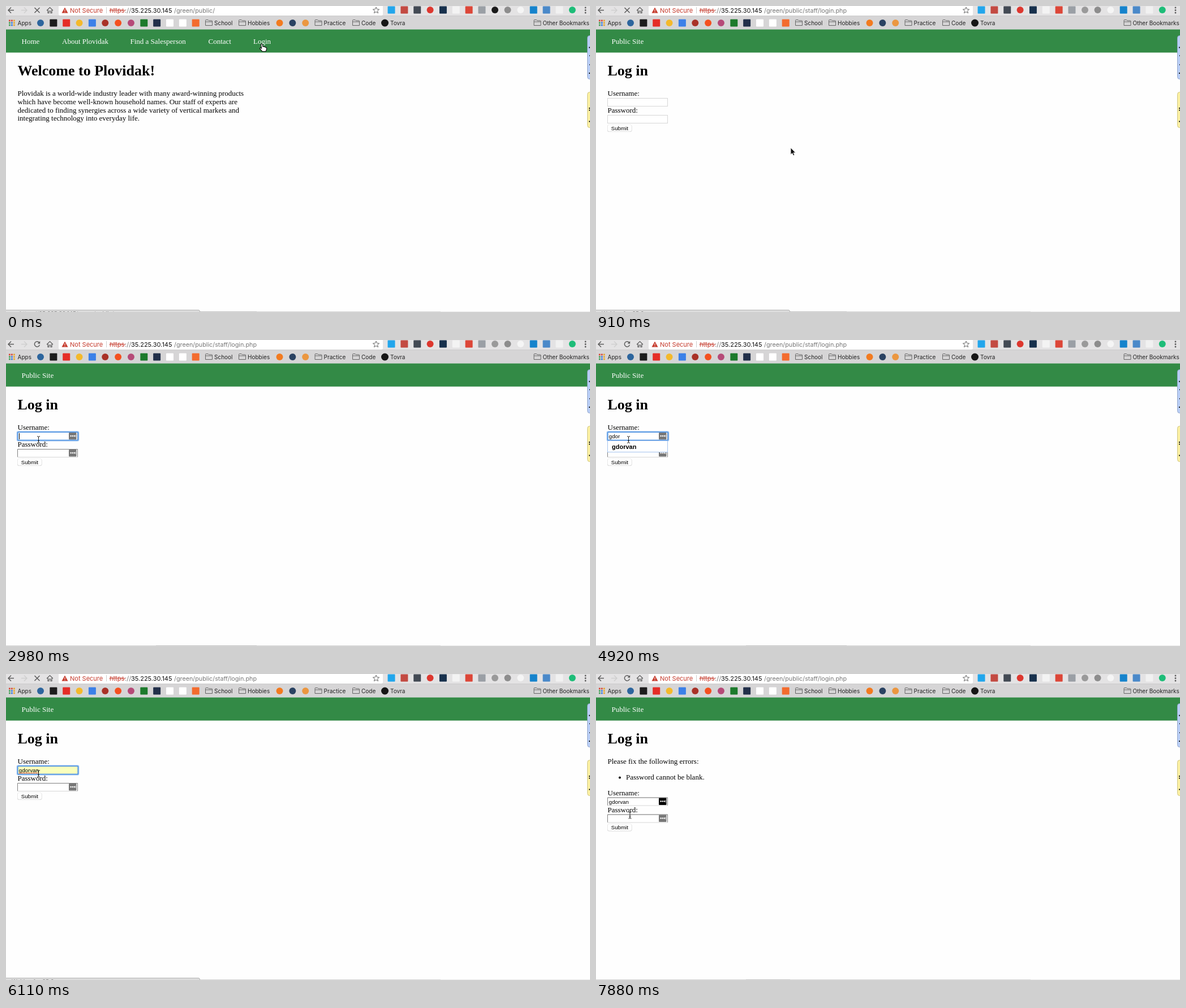
An HTML page that plays this animation: 1032 px wide and 542 px high, repeating every 8000 ms.

```html
<!DOCTYPE html>
<html lang="en">
<head>
<meta charset="utf-8">
<title>Log in</title>
<style>
  html, body { margin: 0; width: 100%; height: 100%; overflow: hidden; background: #fefefe; }
  svg { display: block; width: 100%; height: 100%; }
  text { white-space: pre; }
  .ui { font: 11px Inter, Roboto, sans-serif; }
  .bookmark { font: 10px Inter, Roboto, sans-serif; fill: #222; }
  .page { font: 13px "Liberation Serif", serif; }
  .title { font: bold 26px "Liberation Serif", serif; }
  .field { font: 9.7px "Liberation Sans", sans-serif; }
  .option { font: bold 11px "Liberation Sans", sans-serif; }
  .nav { fill: #fff; }
  .line { fill: none; stroke: #5c5c5c; stroke-width: 1.5; }
</style>
</head>
<body>
<svg viewBox="0 0 1032 542" preserveAspectRatio="none">
  <defs>
    <g id="folder">
      <path d="M.5 10.5V1.5Q.5.5 1.5.5H5L6.5 2H11.5Q12.5 2 12.5 3V10.5ZM.5 4H12.5" fill="none" stroke="#666"/>
    </g>
    <g id="key">
      <rect x="111" y="164" width="13.5" height="12.5" rx="1"/>
      <g fill="#fff">
        <circle cx="114.5" cy="170" r="1.2"/><circle cx="117.6" cy="170" r="1.2"/><circle cx="120.7" cy="170" r="1.2"/>
        <rect x="122.4" y="168" width=".8" height="4"/>
      </g>
    </g>
    <g id="box">
      <rect x="20.5" y="163.5" width="106" height="14" fill="#fff" stroke="#d6d6d6"/>
    </g>
    <path id="inset" d="M20.5 177V163.5H126.5V177" fill="none" stroke="#808080"/>
  </defs>

  <!-- browser chrome -->
  <rect width="1032" height="41.5" fill="#d6d5d6"/>
  <rect width="1032" height="17" fill="#e4e3e4"/>
  <path d="M93 0H666V14Q666 17 663 17H96Q93 17 93 14Z" fill="#fff"/>
  <path d="M0 17.5H1032" stroke="#cbcacb"/>
  <path class="line" d="M14 7.5H4M9 2.5L4 7.5L9 12.5"/>
  <path class="line" d="M27 7.5H37M32 2.5L37 7.5L32 12.5" style="stroke:#cfcfcf"/>
  <path class="line" id="stop" d="M50.5 3L59.5 12M59.5 3L50.5 12"/>
  <g id="reload">
    <path class="line" d="M58.6 4.5A4.6 4.6 0 1 0 59.4 8.6"/>
    <path d="M60.2 2V6.6H55.6Z" fill="#5c5c5c"/>
  </g>
  <path class="line" d="M72 8L77.5 2.5L83 8M74 7V12.5H76V9H79V12.5H81V7" style="stroke-width:1.2"/>
  <path d="M104 2.5L109.5 12.5H98.5Z" fill="#c53a2c"/>
  <path d="M104 6V9.3M104 10.3V11.4" stroke="#fff"/>
  <g class="ui">
    <text x="113" y="12" fill="#c53a2c">Not Secure</text>
    <path d="M177.5 2V13" stroke="#ccc"/>
    <text x="183" y="12" fill="#c53a2c">https</text>
    <path d="M182.5 8H211" stroke="#c53a2c"/>
    <text x="210" y="12" fill="#777">://</text>
    <text x="221" y="12" fill="#111">35.225.30.145</text>
    <text id="path" x="297" y="12" fill="#777" style="font-size:10.8px"></text>
  </g>
  <path d="M654 2L655.6 5.7L659.6 6L656.5 8.6L657.5 12.5L654 10.4L650.5 12.5L651.5 8.6L648.4 6L652.4 5.7Z" fill="none" stroke="#666"/>
  <g fill="#5c5c5c"><circle cx="1024" cy="3" r="1.4"/><circle cx="1024" cy="7.5" r="1.4"/><circle cx="1024" cy="12" r="1.4"/></g>
  <g id="marks"></g>
  <g id="apps"></g>
  <g id="folders"></g>
  <text class="bookmark" x="20.5" y="33.5">Apps</text>
  <text class="bookmark" x="679" y="33.5">Tovra</text>

  <!-- page -->
  <rect y="41.5" width="1032" height="41" fill="#338a46"/>
  <g id="home">
    <g class="page nav">
      <text x="27.5" y="67">Home</text>
      <text x="99" y="67">About Plovidak</text>
      <text x="219.5" y="67">Find a Salesperson</text>
      <text x="357.5" y="67">Contact</text>
      <text x="437" y="67">Login</text>
    </g>
    <text class="title" x="20.5" y="123">Welcome to Plovidak!</text>
    <g class="page">
      <text x="20.5" y="159">Plovidak is a world-wide industry leader with many award-winning products</text>
      <text x="20.5" y="174">which have become well-known household names. Our staff of experts are</text>
      <text x="20.5" y="188.5">dedicated to finding synergies across a wide variety of vertical markets and</text>
      <text x="20.5" y="203">integrating technology into everyday life.</text>
    </g>
  </g>
  <g id="login">
    <text class="page nav" x="27.5" y="67">Public Site</text>
    <text class="title" x="20.5" y="123">Log in</text>
    <g id="errors" class="page">
      <text x="20.5" y="159">Please fix the following errors:</text>
      <circle cx="42" cy="183.5" r="2"/>
      <text x="53" y="187">Password cannot be blank.</text>
    </g>
    <g id="form">
      <text class="page" x="20.5" y="159">Username:</text>
      <text class="page" x="20.5" y="189">Password:</text>
      <use href="#box"/>
      <use href="#box" y="30"/>
      <g id="ready">
        <use href="#inset"/>
        <use href="#inset" y="30"/>
        <use href="#key" id="userKey"/>
        <use href="#key" y="30" fill="#777"/>
      </g>
      <rect x="20" y="210.5" width="43.5" height="12.5" rx="3" fill="#d4d4d4"/>
      <rect x="20.5" y="210" width="42.5" height="12.3" rx="3" fill="#fff" stroke="#e6e6e6" stroke-width=".6"/>
      <text class="field" x="26.7" y="219.7">Submit</text>
      <rect id="filled" x="21" y="164" width="106" height="13" fill="#faffbd"/>
      <g id="focus" fill="none">
        <rect id="glow" x="20" y="162.7" width="108" height="15.4" rx="1.5" stroke="#a5c9f3" stroke-width="2.8"/>
        <rect x="20.7" y="163.2" width="106.6" height="14.4" rx="1" stroke="#4b90e0" stroke-width="1.5"/>
      </g>
      <text id="typed" class="field" x="22.8" y="174"></text>
      <path id="squiggle" d="M23 175.5H58" stroke="#e0402e" stroke-width="1.3" stroke-dasharray="2 1"/>
      <rect id="caret" y="165" width="1" height="11"/>
      <g id="menu">
        <rect id="menuBack" x="20.5" y="178.5" width="106" height="20" stroke="#a4c3ee"/>
        <text class="option" x="28" y="193">gdorvan</text>
      </g>
    </g>
  </g>

  <!-- notes at the right edge -->
  <rect x="1027.5" y="52.5" width="20" height="77" rx="4" fill="#b9cef6" stroke="#96a9cc"/>
  <path d="M1030 73.500H1032M1031 88H1032M1031 104H1032M1030 119H1032" stroke="#222" stroke-width="2"/>
  <rect x="1027.500" y="152.500" width="20" height="63" rx="4" fill="#fbf0a2" stroke="#d0c684"/>
  <path d="M1030 181H1032M1030 184.500H1032M1030 204.500H1032" stroke="#222" stroke-width="2"/>

  <!-- bottom edge -->
  <path d="M0 541.500H768" stroke="#d2d2d2"/>
  <path d="M768 541.500H1032" stroke="#e8e8e8"/>
  <path id="shade" stroke="#bdbdbd"/>
  <g id="status">
    <path d="M-1 543V538.500H340Q342.500 538.500 342.500 541V543" fill="#dcdcdc" stroke="#b4b4b4"/>
    <text id="statusText" class="ui" y="549" fill="#777" style="font-size:10px"></text>
  </g>

  <g id="cursor">
    <path id="arrow" d="M0 0V12.300L2.800 9.700L4.700 14L6.800 13.100L4.900 8.900H8.600Z" fill="#111" stroke="#fff" stroke-width=".8"/>
    <path id="hand" d="M-1.500 1Q0-1 1.200 1L2 5Q4 4 4.600 5.500Q6.500 5 7 6.500Q8.500 6 8.500 8V10L7 13.500H.8L-3.500 8.500Q-3.500 6.800-1.800 7.200L-.5 8Z" fill="#fff" stroke="#111" stroke-width="1.200"/>
    <path id="beam" d="M-2.500-6Q0-6 0-4Q0-6 2.500-6M0-4.500V4.500M-2.500 6Q0 6 0 4Q0 6 2.500 6M-1.500 2H1.500" fill="none" stroke="#222"/>
  </g>
</svg>
<script>
  const LOOP = 8000;
  const $ = id => document.getElementById(id);
  const show = (id, on) => { $(id).style.display = on ? '' : 'none'; };
  const set = (id, name, value) => $(id).setAttribute(name, value);
  const dot = (x, y, color, r = 6) => `<circle cx="${x}" cy="${y}" r="${r}" fill="${color}"/>`;
  const square = (x, y, color) =>
    `<rect x="${x - 6.5}" y="${y - 6.5}" width="13" height="13" rx="1" fill="${color}"/>`;

  // Plain stand-ins for icons, evenly spaced: o = circle, s = square.
  const icons = (x, y, list) => list.split(' ').map((item, i) =>
    (item[0] === 'o' ? dot : square)(x + i * 22.85, y, item.slice(1))).join('');

  $('marks').innerHTML =
    icons(61, 30, 'o#2d659d s#1c1c1c s#e52d27 o#f4b92b s#3b80e8 o#a93127 o#f4501f o#b64a78 s#1c7a2c s#22304a s#fff s#fff s#f36c2e') +
    icons(483.5, 30, 'o#f27b20 o#2a4262 o#eb9740') + dot(669.5, 30, '#161616', 6.5) +
    icons(681, 7, 's#22a6ec s#c34a42 s#434a54 o#dd372f s#17304c s#f3f3f3 s#dc4638 s#9a9fa5') +
    '<circle id="mark" cx="864" cy="7" r="6"/>' +
    icons(886.5, 7, 'o#8d8d8d o#f5f5f5 s#1583cc s#4a89c9 s#f1f1f1 o#1dbd78');

  const hues = ['#d8483b', '#d8483b', '#e9a72e', '#48a058', '#3c7be0', '#e9a72e', '#48a058', '#3c7be0', '#e9a72e'];
  $('apps').innerHTML = hues.map((hue, i) =>
    `<rect x="${5 + i % 3 * 4}" y="${24.5 + Math.floor(i / 3) * 4}" width="2.800" height="2.800" fill="${hue}"/>`).join('');

  $('folders').innerHTML = [[352, 'School'], [411, 'Hobbies'], [545.5, 'Practice'], [612, 'Code'], [932.5, 'Other Bookmarks']]
    .map(([x, label]) => `<use href="#folder" x="${x}" y="24"/><text class="bookmark" x="${x + 16}" y="33.5">${label}</text>`).join('');

  // Pointer positions, each held until the next: time, x, y, shape.
  const pointer = [
    [0, 452, 67, 'hand'], [150, 449, 86, 'arrow'], [300, 426, 132, 'arrow'], [450, 398, 182, 'arrow'],
    [600, 370, 222, 'arrow'], [760, 352, 244, 'arrow'], [910, 344, 251, 'arrow'],
    [1360, 335, 246, 'arrow'], [1510, 265, 210, 'arrow'], [1650, 150, 164, 'arrow'],
    [1800, 42, 133, 'arrow'], [1950, 2.5, 133, 'arrow'], [2090, 34, 157, 'arrow'], [2240, 57.5, 176.5, 'beam'],
    [6850, 61, 184, 'beam'], [6990, 69, 205, 'arrow'], [7140, 75, 222, 'beam'], [7430, 75, 229, 'beam'],
    [7730, 55, 241, 'beam'], [7880, 60, 250, 'beam']
  ];
  const keystrokes = [3880, 4030, 4180, 4330];
  const user = 'gdorvan';

  function render(t) {
    const between = (a, b) => t >= a && t < b;
    const onLogin = t >= 600, failed = t >= 6400, filled = t >= 5070;
    const loading = t < 1060 || between(5660, 6700);

    show('home', !onLogin);
    show('login', onLogin);
    $('path').textContent = onLogin ? '/green/public/staff/login.php' : '/green/public/';
    set('mark', 'fill', onLogin ? '#9a9a9a' : '#1a1a1a');
    show('stop', loading);
    show('reload', !loading);

    show('errors', failed);
    set('form', 'transform', `translate(0 ${failed ? 55.5 : 0})`);
    show('ready', between(1060, 6400) || t >= 6700);
    show('userKey', !filled || failed);
    set('userKey', 'fill', failed ? '#000' : '#777');

    show('focus', between(2690, 6400));
    set('glow', 'stroke-width', t < 2840 ? 4.5 : 2.8);
    show('filled', filled && !failed);
    show('squiggle', between(5520, 6400));
    const count = filled ? user.length : keystrokes.filter(k => t >= k).length;
    $('typed').textContent = user.slice(0, count);
    show('caret', between(2980, 3430) || between(3880, 4920));
    set('caret', 'x', 23 + [0, 5.4, 10.8, 16.2, 19.5][Math.min(count, 4)]);
    show('menu', between(3880, 5520));
    set('menuBack', 'fill', filled ? '#cdcdcd' : '#fff');

    show('status', t < 1510 || between(5960, 7140));
    set('statusText', 'x', t < 600 ? 24 : 10);
    $('statusText').textContent = t < 600 ? 'https://35.225.30.145/green/public/' : 'Waiting for 35.2';
    set('shade', 'd', t < 5960 ? 'M265 541.5H443' : 'M265 541.5H343');

    const [, x, y, shape] = pointer.filter(p => p[0] <= t).pop();
    set('cursor', 'transform', `translate(${x} ${y})`);
    for (const name of ['arrow', 'hand', 'beam']) show(name, name === shape);
  }

  function tick() {
    render(performance.now() % LOOP);
    requestAnimationFrame(tick);
  }
  tick();
</script>
</body>
</html>
```
